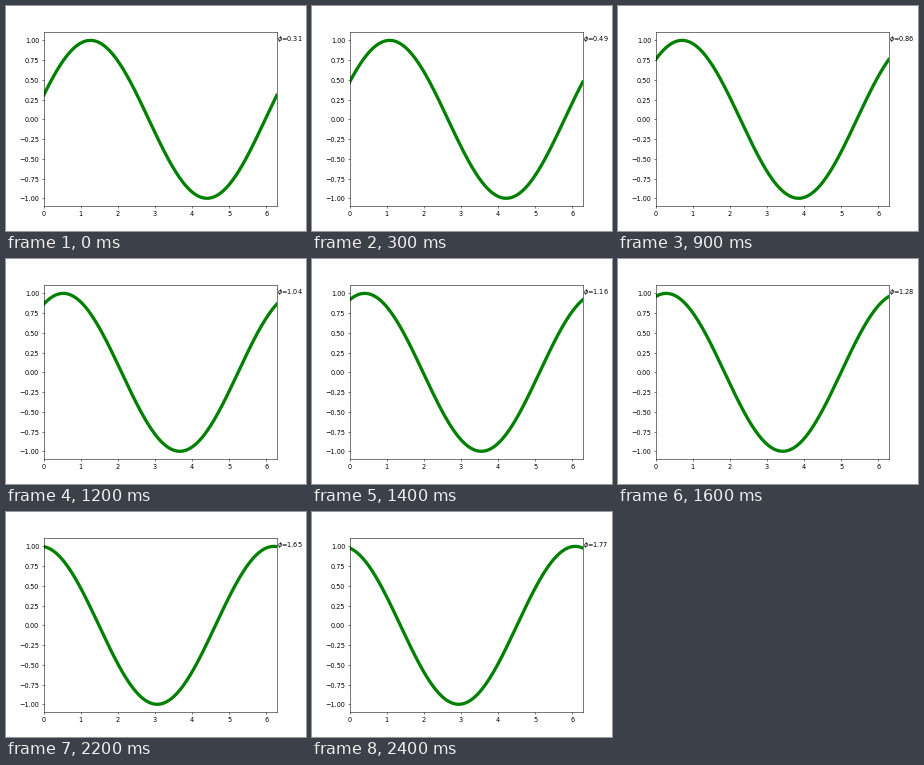
A matplotlib script that plays this animation: 300 px wide and 225 px high, repeating every 2.5 s.

```python
import numpy as np
import matplotlib.pyplot as plt
from matplotlib.animation import FuncAnimation
from matplotlib.transforms import ScaledTranslation

W, H, DPI = 300, 225, 47
FULL_W, FULL_H = 6.4 * DPI, 4.8 * DPI  # default figure, a fraction over the stage
FRAMES, INTERVAL = 25, 100
START, STEP = 0.3085, 0.061

fig, ax = plt.subplots(figsize=(W / DPI, H / DPI), dpi=DPI)
kx, ky = FULL_W / W, FULL_H / H
fig.subplots_adjust(left=0.125 * kx, right=0.9 * kx,
                    bottom=0.11 * ky, top=0.88 * ky)

x = np.linspace(0, 2 * np.pi, 200)
line, = ax.plot(x, np.sin(x), color="green", lw=5)
label = ax.text(2 * np.pi, 1, "")
ax.set_xlim(0, 2 * np.pi)
ax.set_ylim(-1.1, 1.1)

# Text hangs from the top of the full height, so it sits slightly lower.
drop = ScaledTranslation(0, (H - FULL_H) / DPI, fig.dpi_scale_trans)
for text in [label, *ax.get_xticklabels(), *ax.get_yticklabels()]:
    text.set_transform(text.get_transform() + drop)


def update(i):
    phase = START + STEP * i
    line.set_ydata(np.sin(x + phase))
    label.set_text(rf"$\phi$={phase:.2f}")
    return line, label


anim = FuncAnimation(fig, update, frames=FRAMES, interval=INTERVAL,
                     repeat=True, repeat_delay=0)
plt.show()
```
